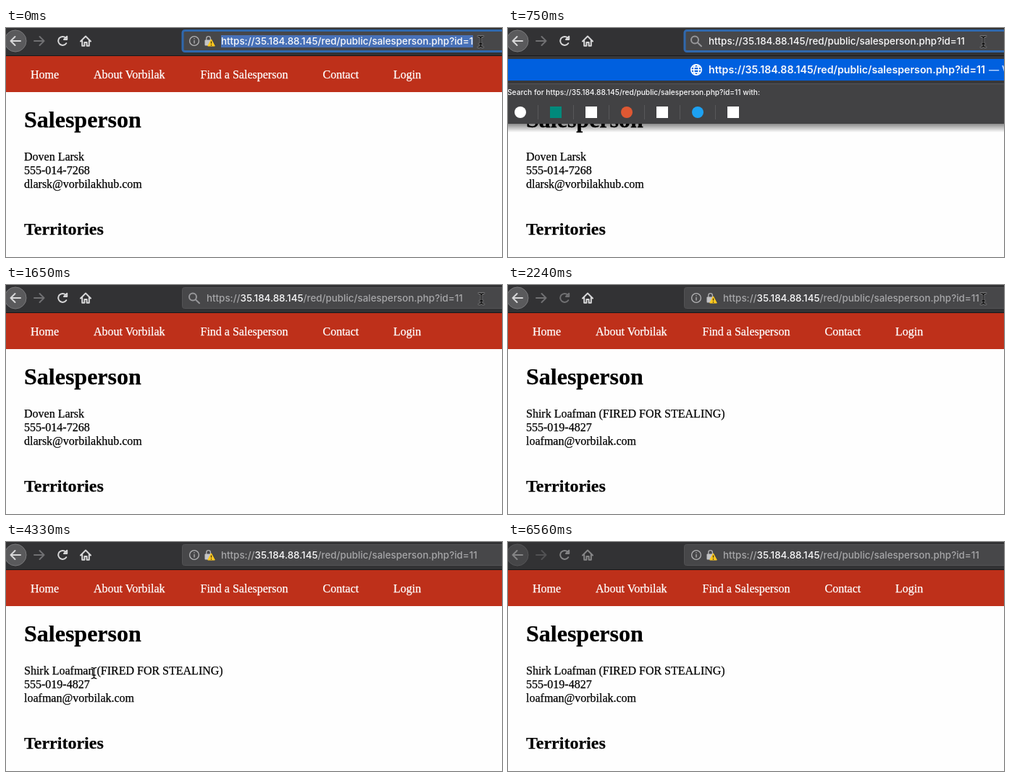
Write an HTML page that moves like this. It is 685 by 318 pixels and loops after 6.66 s.

```html
<!DOCTYPE html>
<html lang="en">
<head>
<meta charset="utf-8">
<title>Salesperson</title>
<style>
  html, body { margin: 0; width: 100%; height: 100%; overflow: hidden; background: #fefefe; }
  svg { display: block; }
  text { white-space: pre; }
  .page { font: 16px "Liberation Serif", "Times New Roman", serif; }
  .page text { fill: #000; stroke: #000; stroke-width: .25; }
  .page .nav text { fill: #fff; stroke: #fff; }
  .h1 { font-size: 32px; font-weight: bold; }
  .h2 { font-size: 24px; font-weight: bold; }
  .ui { font: 500 13.4px Inter, Roboto, sans-serif; fill: #f9f9fa; }
  .line { fill: none; stroke: #d8d8d9; stroke-width: 2; stroke-linecap: round; stroke-linejoin: round; }
  .dim { stroke: #707072; }
  .soft { fill: none; stroke: #b4b4b6; stroke-width: 1.3; }
  .grey { fill: #a6a6a8; }
</style>
</head>
<body>
<svg width="685" height="318" viewBox="0 0 685 318">
  <defs>
    <linearGradient id="shade" x1="0" y1="0" x2="0" y2="1">
      <stop offset="0" stop-color="#000" stop-opacity=".45"/>
      <stop offset="1" stop-color="#000" stop-opacity="0"/>
    </linearGradient>
    <path id="turn" d="M83.2 21.2A6 6 0 1 1 82.4 13.6M84.2 11.8V16H80Z"/>
    <path id="bar" d="M-3.2-7.6Q0-7.4 0-5V5Q0 7.4-3.2 7.6M3.2-7.6Q0-7.4 0-5M0 5Q0 7.4 3.2 7.6M-2 3H2"/>
  </defs>

  <g class="page">
    <rect width="685" height="318" fill="#fefefe"/>
    <rect y="39" width="685" height="50" fill="#be301a"/>
    <g class="nav">
      <text x="34" y="70">Home</text>
      <text x="121" y="70">About Vorbilak</text>
      <text x="268.5" y="70">Find a Salesperson</text>
      <text x="437.5" y="70">Contact</text>
      <text x="535" y="70">Login</text>
    </g>
    <text class="h1" x="25" y="138">Salesperson</text>
    <g id="first">
      <text x="25" y="184">Doven Larsk</text>
      <text x="25" y="203">555-014-7268</text>
      <text x="25" y="222">dlarsk@vorbilakhub.com</text>
    </g>
    <g id="second">
      <text x="25" y="184">Shirk Loafman (FIRED FOR STEALING)</text>
      <text x="25" y="203">555-019-4827</text>
      <text x="25" y="222">loafman@vorbilak.com</text>
    </g>
    <text class="h2" x="25" y="287">Territories</text>
  </g>

  <g class="ui">
    <rect width="685" height="38" fill="#323234"/>
    <rect y="38" width="685" height="1" fill="#18181a"/>

    <g id="tools">
      <circle cx="13" cy="18" r="15" fill="#5a5a5c" stroke="#79797b"/>
      <path class="line" d="M20 18H6.5M12.5 12L6.5 18L12.5 24"/>
      <path class="line dim" d="M39 18H52.5M46.5 12L52.5 18L46.5 24"/>
      <use id="reload" class="line" href="#turn"/>
      <use id="waiting" class="line dim" href="#turn"/>
      <path id="stop" class="line" d="M73 13L83.5 23.5M83.5 13L73 23.5"/>
      <path class="line" d="M103 18.5L110 11.5L117 18.5M105.2 17.5V24.8H108.4V20H111.6V24.8H114.8V17.5"/>
    </g>

    <rect x="243.5" y="3.5" width="460" height="29" rx="3" fill="#474749" stroke="#535355"/>
    <rect id="ring" x="244" y="3.5" width="460" height="29" rx="3" fill="#474749" stroke="#3068ad" stroke-width="3"/>
    <rect id="marked" x="297" y="10" width="348" height="17" fill="#4871b8"/>

    <g id="site">
      <circle class="soft" cx="260" cy="18" r="6.4"/>
      <path class="soft" d="M260 17V21.6M260 14.2V15.6"/>
      <path class="soft" stroke-width="1.8" d="M276.8 17V14.4A2.8 2.8 0 0 1 282.4 14.4V17"/>
      <rect x="274.5" y="16.5" width="9.5" height="8" rx="1" fill="#c4c4c6"/>
      <path d="M283.5 15.8L288.3 25H278.7Z" fill="#ffc91f" stroke="#ffc91f" stroke-linejoin="round"/>
      <path d="M283.5 18.4V21.8M283.5 23V24.4" stroke="#4a3c10" stroke-width="1.4"/>
    </g>
    <g id="lens" fill="none" stroke="#97979a" stroke-width="2" stroke-linecap="round">
      <circle cx="258" cy="16.5" r="5"/>
      <path d="M262 20.5L267 25.2"/>
    </g>
    <g id="urls"></g>
    <rect id="caretA" x="645" y="10" width="1" height="17"/>
    <rect id="caretB" x="631" y="10" width="1" height="17"/>

    <g id="popup">
      <rect y="133" width="685" height="12" fill="url(#shade)"/>
      <rect y="39" width="685" height="94" fill="#38383a"/>
      <rect y="43" width="685" height="30" fill="#0060df"/>
      <rect y="77" width="685" height="56" fill="#424244"/>
      <rect y="77" width="685" height="1" fill="#555557"/>
      <g fill="none" stroke="#fff" stroke-width="1.6">
        <circle cx="260" cy="58" r="7.2"/>
        <ellipse cx="260" cy="58" rx="3.4" ry="7.2"/>
        <path d="M253 58H267M254 54.2H266M254 61.8H266"/>
      </g>
      <g font-size="14.2" font-weight="600">
        <text x="277" y="63">https://35.184.88.145/red/public/salesperson.php?id=11</text>
        <text x="664" y="63" fill="#b5d2ff">— V</text>
      </g>
      <text x="-1" y="93" font-size="10.2">Search for https://35.184.88.145/red/public/salesperson.php?id=11 with:</text>
      <g id="engines"></g>
    </g>
  </g>

  <g id="ibeam" fill="none" stroke-linecap="round">
    <use href="#bar" stroke="#fff" stroke-opacity=".45" stroke-width="2.6"/>
    <use href="#bar" stroke="#000" stroke-width="1.3"/>
  </g>
  <path id="arrow" d="M0 0V14.2L3.3 11.2L5.6 16.4L8 15.4L5.8 10.4H10.2Z" fill="#000" stroke="#fff" stroke-width="1.2"/>
</svg>

<script>
const LOOP = 6660;
const NS = 'http://www.w3.org/2000/svg';
const $ = id => document.getElementById(id);

function add(parent, tag, attrs, text = '') {
  const el = document.createElementNS(NS, tag);
  for (const key in attrs) el.setAttribute(key, attrs[key]);
  el.textContent = text;
  parent.append(el);
  return el;
}

// Each step is [time, style] and holds until the next one.
function play(el, steps) {
  const frames = steps.map(([t, style]) => ({ offset: t / LOOP, easing: 'steps(1, end)', ...style }));
  frames.push({ offset: 1, ...steps[steps.length - 1][1] });
  el.animate(frames, { duration: LOOP, iterations: Infinity });
}

const fade = (el, ...steps) => play(el, steps.map(([t, opacity]) => [t, { opacity }]));

// Visible from start to end, hidden otherwise.
function show(el, start, end = LOOP) {
  const steps = start ? [[0, 0], [start, 1]] : [[0, 1]];
  if (end < LOOP) steps.push([end, 0]);
  fade(el, ...steps);
}

function address(x, id, focused, start, end) {
  const line = add($('urls'), 'text', { x, y: 23 });
  const tone = focused ? '' : 'grey';
  add(line, 'tspan', { class: tone }, 'https://');
  add(line, 'tspan', {}, '35.184.88.145');
  add(line, 'tspan', { class: tone }, '/red/public/salesperson.php?id=' + id);
  show(line, start, end);
}

address(297, '1', true, 0, 750);
address(277, '11', true, 750, 1650);
address(277, '11', false, 1650, 1950);
address(297, '11', false, 1950);

const engines = [
  ['circle', '#fff'], ['rect', '#00897b'], ['rect', '#fff'], ['circle', '#de5833'],
  ['rect', '#fff'], ['circle', '#1da1f2'], ['rect', '#fff']
];
engines.forEach(([tag, fill], i) => {
  const cx = 17 + 49 * i, cy = 117;
  const shape = tag === 'circle' ? { cx, cy, r: 8 } : { x: cx - 8, y: cy - 8, width: 16, height: 16 };
  add($('engines'), tag, { ...shape, fill });
  if (i < 6) add($('engines'), 'rect', { x: cx + 24, y: 107, width: 1, height: 20, fill: '#58585a' });
});

show($('ring'), 0, 1650);
show($('marked'), 0, 150);
show($('caretA'), 300, 750);
show($('caretB'), 1350, 1650);
show($('popup'), 750, 1650);
show($('lens'), 750, 1950);
fade($('site'), [0, 1], [750, 0], [1950, 1]);
show($('first'), 0, 2100);
show($('second'), 2100);
fade($('reload'), [0, 1], [1800, 0], [2540, 1]);
show($('stop'), 1800, 2240);
show($('waiting'), 2240, 2540);
fade($('tools'), [0, 1], [6560, 0.5]);

const path = [
  [0, 'ibeam', 655.5, 19], [150, 'ibeam', 656.5, 19],
  [3290, 'arrow', 629.5, 34], [3440, 'arrow', 530, 70], [3590, 'arrow', 390, 112],
  [3740, 'arrow', 245, 150], [3890, 'ibeam', 125, 178], [4040, 'ibeam', 73, 184],
  [4180, 'ibeam', 92, 183], [4330, 'ibeam', 121.5, 182],
  [4480, 'ibeam', 117, 178], [4630, 'ibeam', 136, 180], [4780, 'ibeam', 182, 181],
  [4930, 'ibeam', 238, 181], [5070, 'ibeam', 282, 181], [5220, 'arrow', 306, 177],
  [5370, 'arrow', 312.5, 178], [5510, 'arrow', 372, 194], [5660, 'arrow', 460, 231],
  [5810, 'arrow', 545, 267], [5960, '', 545, 267]
];
for (const kind of ['ibeam', 'arrow']) {
  play($(kind), path.map(([t, shape, x, y]) =>
    [t, { transform: `translate(${x}px, ${y}px)`, opacity: shape === kind ? 1 : 0 }]));
}
</script>
</body>
</html>
```
